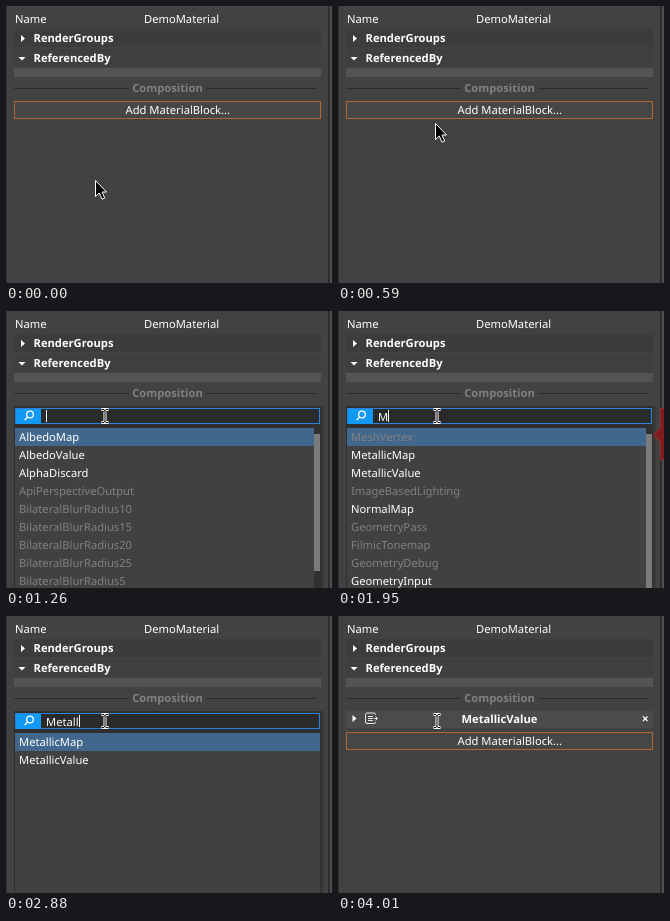
Write an HTML page that moves like this. It is 326 px wide and 277 px high and loops after 5.17 s.

```html
<!DOCTYPE html>
<html lang="en">
<head>
<meta charset="utf-8">
<title>Material block picker</title>
<style>
html, body { margin: 0; width: 100%; height: 100%; overflow: hidden; background: #424242; }
svg { display: block; width: 326px; height: 277px; }
text { font: 11.2px "Noto Sans", "Open Sans", sans-serif; fill: #fff; white-space: pre; text-rendering: geometricPrecision; }
.bold { font-weight: 700; }
.mid { text-anchor: middle; }
</style>
</head>
<body>
<svg id="stage" viewBox="0 0 326 277">
  <rect width="326" height="277" fill="#424242"/>
  <rect width="1" height="277" fill="#303030"/>
  <rect x="322" width="2" height="277" fill="#2d2d2d"/>
  <rect x="324" width="2" height="277" fill="#505050"/>

  <text x="9" y="17">Name</text>
  <text x="138" y="17">DemoMaterial</text>
  <rect x="8" y="23" width="307" height="18" fill="#3c3c3c"/>
  <path d="M15 29l4 3.5-4 3.5z" fill="#fff"/>
  <text class="bold" x="27.5" y="36">RenderGroups</text>
  <rect x="8" y="43" width="307" height="18" fill="#3f3f3f"/>
  <path d="M12.5 51h7l-3.5 3.5z" fill="#fff"/>
  <text class="bold" x="27.5" y="56">ReferencedBy</text>
  <rect x="8" y="62" width="307" height="9" fill="#545454"/>
  <path d="M8 82.5H123M200 82.5H311" stroke="#2b2b2b"/>
  <text class="bold mid" x="161.5" y="86" style="fill:#808080">Composition</text>

  <g id="block">
    <rect x="8" y="95" width="307" height="17" fill="#4b4b4b"/>
    <path d="M14.5 99l4 3.5-4 3.5z" fill="#fff"/>
    <g fill="none" stroke="#e6e6e6">
      <path d="M37.5 99V98.500q0-1.500-1.500-1.500H29q-1.500 0-1.500 1.500V106q0 1.500 1.500 1.500H36q1.500 0 1.500-1.500"/>
      <path d="M30 100.500H35M30 102.500H35M30 104.500H35"/>
      <path d="M36 102.500H39M37.500 100.500l2 2-2 2"/>
    </g>
    <text class="bold mid" x="161.5" y="107">MetallicValue</text>
    <path d="M305 100.500l4.500 4.500m0-4.500l-4.500 4.500" stroke="#fff" stroke-width="1.200"/>
  </g>

  <g id="button">
    <rect id="face" x="8.5" y="95.5" width="306" height="17" fill="#464646" stroke="#b4642f"/>
    <text class="mid" x="171.8" y="108">Add MaterialBlock...</text>
  </g>

  <g id="popup">
    <rect x="8" y="95" width="310" height="182" fill="#393939"/>
    <rect x="8" y="95" width="307" height="182" fill="#2f2f2f"/>
    <rect x="9.5" y="97.5" width="304" height="15" fill="#2a2a2a" stroke="#2a82da"/>
    <rect x="10" y="98" width="25" height="15" fill="#1299f3"/>
    <g fill="none" stroke="#fff" stroke-width="1.300">
      <circle cx="24" cy="103.500" r="3.300"/>
      <path d="M21.600 106l-3 3"/>
    </g>
    <text id="query" x="40" y="110"></text>
    <rect id="caret" y="99" width="1" height="12" fill="#fff"/>
    <rect x="9" y="117" width="305" height="160" fill="#414141"/>
    <rect id="selection" x="9" y="117" height="18" fill="#41688c"/>
    <g id="rows"></g>
    <g id="scroll">
      <rect x="308" y="117" width="6" height="160" fill="#303030"/>
      <rect id="thumb" x="308" y="123" width="6" fill="#7b7b7b"/>
    </g>
  </g>

  <path id="callout" d="M327 97.500H322.500V117L315.500 124L322.500 131V148.500H327z" fill="#7d1c1c" stroke="#a32a2a"/>

  <path id="arrow" d="M.5.5V16.500L4.200 13L7 19.200L9.700 18L7 12H11.500z" fill="#000" stroke="#fff"/>
  <g id="beam" fill="none">
    <path d="M95.500 98.500H98L99 99.500L100 98.500H102.500M99 99V111M95.500 111.500H98L99 110.500L100 111.500H102.500" stroke="#fff" stroke-width="3"/>
    <path d="M96 98.500H98L99 99.500L100 98.500H102M99 99V111M96 111.500H98L99 110.500L100 111.500H102" stroke="#000"/>
  </g>
</svg>
<script>
const LOOP = 5170;
const PRESS = 1130, OPEN = 1190, HOVER = 1260, DONE = 4010;
const KEYS = [1950, 2120, 2350, 2520, 2750, 2880, 3010, 3180, 3480];
const WORD = 'MetallicV';
// Pointer path: time, x, y
const PATH = [[230, 89, 174], [350, 88, 159], [590, 97, 117], [770, 98, 107], [830, 98, 105]];
// A leading "-" marks an unavailable block
const BLOCKS = ('AlbedoMap AlbedoValue AlphaDiscard -ApiPerspectiveOutput -BilateralBlurRadius10 ' +
  '-BilateralBlurRadius15 -BilateralBlurRadius20 -BilateralBlurRadius25 -BilateralBlurRadius5 ' +
  '-MeshVertex MetallicMap MetallicValue -ImageBasedLighting NormalMap -GeometryPass ' +
  '-FilmicTonemap -GeometryDebug GeometryInput')
  .split(' ').map(s => ({ name: s.replace('-', ''), off: s[0] === '-' }));

const $ = id => document.getElementById(id);
const set = (el, attrs) => { for (const k in attrs) el.setAttribute(k, attrs[k]); };
const show = (id, on) => set($(id), { visibility: on ? 'visible' : 'hidden' });

const rows = Array.from({ length: 9 }, (_, i) => {
  const row = document.createElementNS('http://www.w3.org/2000/svg', 'text');
  set(row, { x: 13, y: 130 + i * 18 });
  $('rows').append(row);
  return row;
});

function matches(query) {
  const at = b => b.name.toLowerCase().indexOf(query.toLowerCase());
  return BLOCKS.filter(b => at(b) >= 0).sort((a, b) => at(a) - at(b));
}

function pointer(t) {
  const time = Math.floor((t - 230) / 30) * 30 + 230;
  if (time <= PATH[0][0]) return PATH[0].slice(1);
  const i = PATH.findIndex(p => p[0] >= time);
  if (i < 0) return PATH[PATH.length - 1].slice(1);
  const [a, b] = [PATH[i - 1], PATH[i]];
  const k = (time - a[0]) / (b[0] - a[0]);
  return [1, 2].map(n => Math.round(a[n] + (b[n] - a[n]) * k));
}

function drawPopup(count) {
  const query = WORD.slice(0, count);
  const list = matches(query);
  const long = list.length > 9;
  const scrolls = count < 2 && long;
  $('query').textContent = query;
  const end = count ? 40 + $('query').getComputedTextLength() : 40;
  set($('caret'), { x: Math.round(end) });
  set($('selection'), { width: scrolls ? 299 : 305 });
  set($('thumb'), { height: count ? 154 : 137 });
  set($('scroll'), { display: scrolls ? 'inline' : 'none' });
  rows.forEach((row, i) => {
    const block = list[i];
    row.textContent = block ? block.name : '';
    row.style.fill = block && block.off ? '#808080' : '#fff';
  });
}

let typed = -1;
function draw(t) {
  const count = KEYS.filter(k => t >= k).length;
  const open = t >= OPEN && t < DONE;
  const done = t >= DONE;
  if (count !== typed) drawPopup(typed = count);
  show('popup', open);
  show('callout', open && (count === 1 || count === 2));
  show('block', done);
  show('button', !open);
  set($('button'), { transform: `translate(0 ${done ? 21 : 0})` });
  set($('face'), { fill: t >= PRESS && t < OPEN ? '#393939' : '#464646' });
  show('arrow', t < HOVER);
  show('beam', t >= HOVER);
  set($('arrow'), { transform: `translate(${pointer(t)})` });
}

const start = performance.now();
function tick() {
  draw((performance.now() - start) % LOOP);
  requestAnimationFrame(tick);
}
tick();
</script>
</body>
</html>
```
